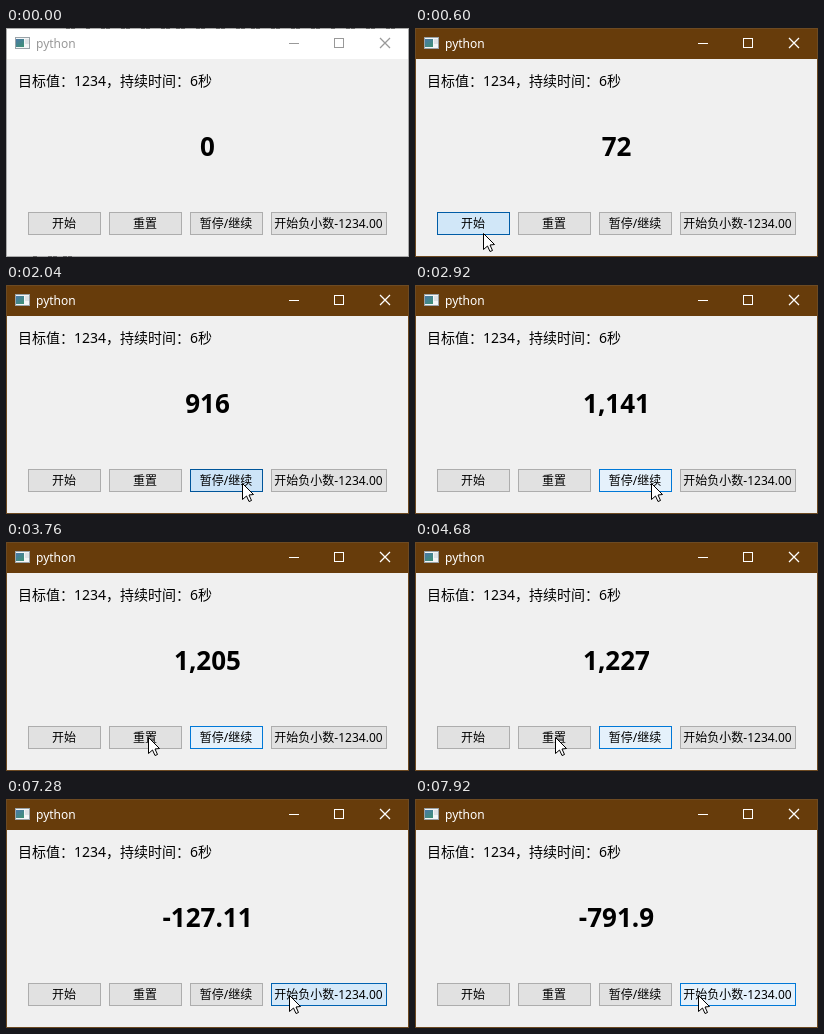
Write an HTML page with a canvas that moves like this. It is 403 by 229 pixels and loops after 8000 ms.

```html
<!DOCTYPE html>
<html lang="zh-CN">
<head>
<meta charset="utf-8">
<title>python</title>
<style>
  html, body { margin: 0; width: 100%; height: 100%; overflow: hidden; background: #f0f0f0; }
  canvas { display: block; }
</style>
</head>
<body>
<canvas id="stage" width="403" height="229"></canvas>
<script>
const ctx = document.getElementById('stage').getContext('2d');
const LOOP = 8000, STEP = 40;
const FONT = '"Noto Sans", "Noto Sans CJK SC", sans-serif';

// Clicks, in ms: a counter reacts when the mouse button is released.
const ACTIVATE = 480, START = 558, PAUSE = 1500, RESUME = 2036;
const RESET = 6740, START_NEGATIVE = 7204.136;

const buttons = [
  { label: '开始', hover: [ACTIVATE, 600], clicks: [START] },
  { label: '重置', hover: [6600, 6800], clicks: [RESET] },
  { label: '暂停/继续', hover: [1280, 6560], clicks: [PAUSE, RESUME] },
  { label: '开始负小数-1234.00', hover: [7000, LOOP], clicks: [START_NEGATIVE], w: 116 }
];
const FILLS = [[225, 225, 225], [229, 241, 251], [204, 228, 247]];
const EDGES = [[173, 173, 173], [0, 120, 215], [0, 84, 153]];

// Each stop: arrival time, travel time, x, y.
const cursorStops = [
  { at: 320, take: 120, x: 68, y: 205 },
  { at: 1000, take: 360, x: 236, y: 198 },
  { at: 3160, take: 240, x: 302, y: 198 },
  { at: 3800, take: 600, x: 140, y: 195 },
  { at: 7080, take: 320, x: 283, y: 196 }
];

const clamp = p => Math.min(1, Math.max(0, p));
const mix = (a, b, p) => a + (b - a) * p;
const smooth = p => p * p * (3 - 2 * p);
const pulse = (t, from, to) => Math.min(clamp((t - from) / 60), 1 - clamp((t - to) / 200));
const outExpo = elapsed => 1235.234 * (1 - 2 ** (-elapsed / 484.242));

function counterText(t) {
  if (t >= START_NEGATIVE) return String(-Math.round(outExpo(t - START_NEGATIVE) * 100) / 100);
  if (t < START || t >= RESET) return '0';
  const value = t < RESUME
    ? outExpo(Math.min(t, PAUSE) - START)
    : 1234.71 - 94 * 2 ** ((2920 - t) / 500);
  return Math.round(Math.min(value, 1234)).toLocaleString('en-US');
}

// Level 0 is normal, 1 hovered, 2 pressed.
function levelColor(palette, level) {
  const i = Math.min(1, Math.floor(level));
  return `rgb(${palette[i].map((v, k) => Math.round(mix(v, palette[i + 1][k], level - i)))})`;
}

function text(str, x, y, size, color, align = 'left', weight = 400) {
  ctx.font = `${weight} ${size}px ${FONT}`;
  ctx.fillStyle = color;
  ctx.textAlign = align;
  ctx.fillText(str, x, y);
}

function rect(x, y, w, h, color) {
  ctx.fillStyle = color;
  ctx.fillRect(x, y, w, h);
}

function outline(x, y, w, h, color) {
  ctx.strokeStyle = color;
  ctx.lineWidth = 1;
  ctx.strokeRect(x + 0.5, y + 0.5, w - 1, h - 1);
}

// Slivers of the text behind the inactive window.
function drawSlivers(y, from, to) {
  for (let x = from; x < to; x += 5) {
    if (Math.sin(x * 12.9) > 0) rect(x, y, 4, 1, '#666');
  }
}

function drawIcon() {
  const glow = ctx.createLinearGradient(10, 11, 16, 19);
  glow.addColorStop(0, '#4b78a8');
  glow.addColorStop(1, '#3f8f78');
  rect(9, 9, 15, 12, '#f4f6f7');
  rect(10, 11, 8, 8, glow);
  rect(19, 11, 4, 5, '#dfe3e6');
  outline(9, 9, 15, 12, '#9aa3a8');
}

function drawWindow(active) {
  const ink = active ? '#fff' : '#999';
  rect(0, 0, 403, 229, '#f0f0f0');
  rect(0, 0, 403, 31, active ? '#673c0b' : '#fff');
  outline(0, 0, 403, 229, active ? '#6d4a22' : '#aaa');
  if (!active) {
    drawSlivers(0, 50, 400);
    drawSlivers(228, 27, 75);
  }
  drawIcon();
  text('python', 30, 20, 12, ink);
  rect(283, 15, 10, 1, ink);
  outline(328, 10, 10, 10, ink);
  ctx.lineWidth = 1.3;
  ctx.beginPath();
  ctx.moveTo(374, 10); ctx.lineTo(384, 20);
  ctx.moveTo(384, 10); ctx.lineTo(374, 20);
  ctx.stroke();
  text('目标值：1234，持续时间：6秒', 12, 58, 14, '#000');
}

function drawButtons(t) {
  let x = 22;
  for (const { label, hover, clicks, w = 73 } of buttons) {
    const press = Math.max(...clicks.map(c => pulse(t, c - 80, c)));
    const level = Math.max(pulse(t, ...hover), press) + press;
    rect(x, 184, w, 23, levelColor(FILLS, level));
    outline(x, 184, w, 23, levelColor(EDGES, level));
    text(label, x + w / 2 - 0.5, 200, 12, '#000', 'center');
    x += w + 8;
  }
}

function drawCursor(t) {
  if (t < 200) return;
  let x = 70, y = 222;
  for (const stop of cursorStops) {
    const p = smooth(clamp(1 - (stop.at - t) / stop.take));
    x = mix(x, stop.x, p);
    y = mix(y, stop.y, p);
  }
  ctx.save();
  ctx.translate(Math.round(x) + 0.5, Math.round(y) + 0.5);
  ctx.lineWidth = 1;
  ctx.fillStyle = '#fff';
  ctx.strokeStyle = '#000';
  const arrow = new Path2D('M0 0V16L4 12.5L6.5 18L9 17L6.5 11.5L11 11Z');
  ctx.fill(arrow);
  ctx.stroke(arrow);
  ctx.restore();
}

function draw(now) {
  const t = Math.floor((now % LOOP) / STEP) * STEP;
  drawWindow(t >= ACTIVATE);
  text(counterText(t), 201.5, 128, 26, '#000', 'center', 700);
  drawButtons(t);
  drawCursor(t);
}

const began = performance.now();
function loop() {
  draw(performance.now() - began);
  requestAnimationFrame(loop);
}
loop();
</script>
</body>
</html>
```
